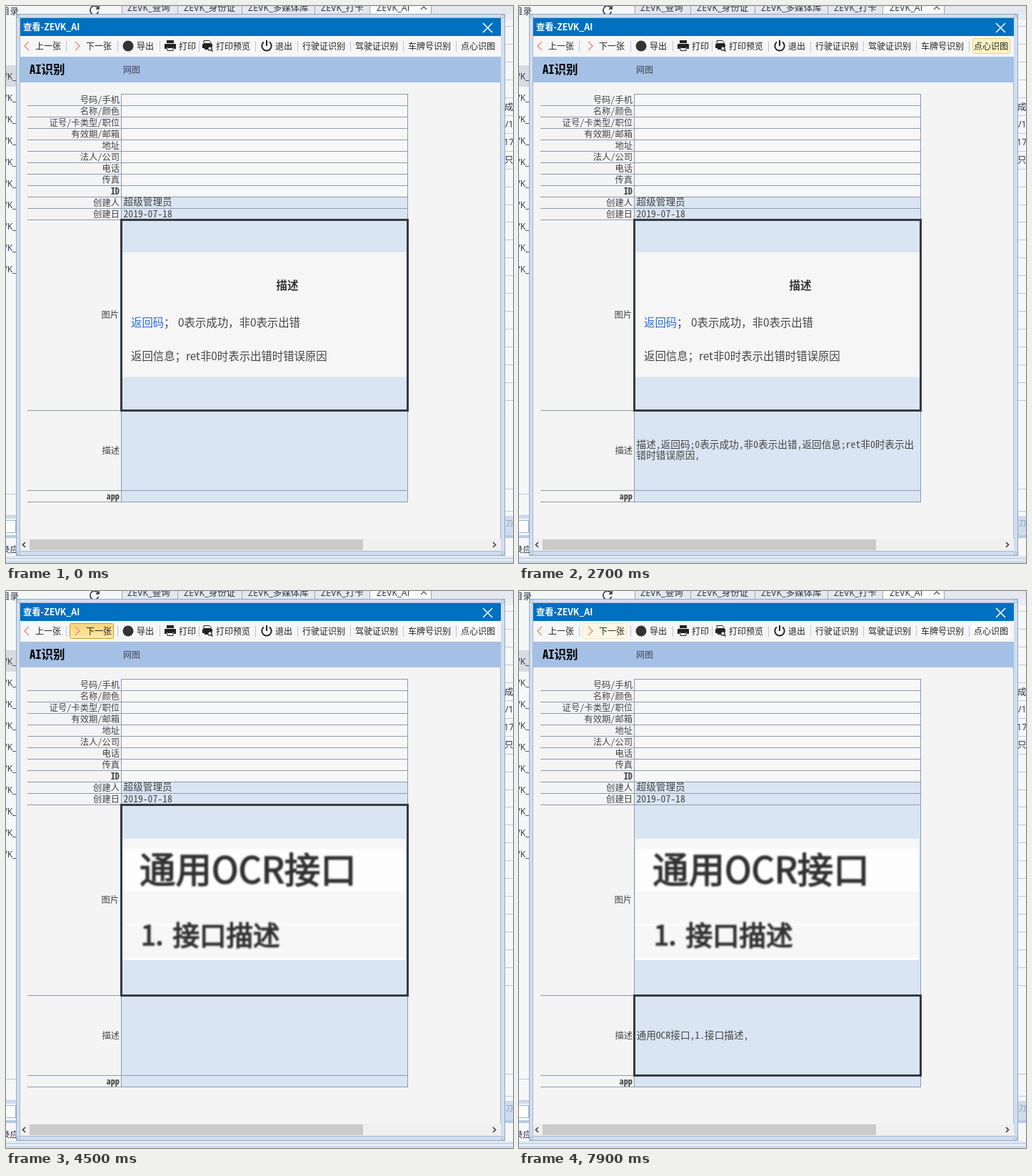
These frames come from a looping animation (710x780 px, 8 s). An HTML page:

```html
<!DOCTYPE html>
<html lang="zh-CN">
<head>
<meta charset="utf-8">
<title>AI识别</title>
<style>
html, body { margin: 0; width: 100%; height: 100%; overflow: hidden; background: #f5f6f8; }
svg { display: block; width: 710px; height: 780px; }
text { font-family: "Noto Sans CJK SC", "Noto Sans CJK JP", sans-serif; font-size: 12px; fill: #222; white-space: pre; }
.form text { font-family: "Noto Sans Mono CJK SC", "Noto Sans CJK SC", monospace; font-size: 12.3px; font-weight: 300; fill: #444; }
.form .val { font-size: 13.65px; }
.form .b, .b { font-weight: bold; }
.end { text-anchor: end; }
.mid { text-anchor: middle; }
.back text { font-family: "Open Sans", "Noto Sans CJK SC", sans-serif; font-size: 12.5px; fill: #2b3447; }
.back .end { font-size: 12px; }
.doc text { font-size: 15.4px; fill: #444; }
.big text { fill: #333; stroke: #333; stroke-width: 1.5; }
.grid { stroke: #8c9bad; fill: none; shape-rendering: crispEdges; }
.sep { stroke: #b5c8de; fill: none; shape-rendering: crispEdges; }
.focus { fill: none; stroke: #353b41; stroke-width: 3; shape-rendering: crispEdges; }
.hover { fill: #fdf2c6; stroke: #e9d28c; }
.press { fill: url(#gold); stroke: #c39a3c; }
.glow { fill: #fdfdfd; }

.anim { opacity: 0; animation: 8s step-end infinite; }
.pic-hover { animation-name: pic-hover; }
.pic-press { animation-name: pic-press; }
.pic-glow { animation-name: pic-glow; }
.next-hover { animation-name: next-hover; }
.next-press { animation-name: next-press; }
.next-glow, .second { animation-name: second; }
.first { animation-name: first; }
.focus-pic { animation-name: focus-pic; }
.focus-desc { animation-name: focus-desc; }
.read1 { animation-name: read1; }
.read2 { animation-name: read2; }

@keyframes pic-hover {
  0% { opacity: 0 } 17.5% { opacity: .08 } 18.75% { opacity: 0 }
  33.75% { opacity: 1 } 36.25% { opacity: .4 } 37.5% { opacity: 0 }
  68.75% { opacity: .4 } 70% { opacity: 1 } 71.25%, 100% { opacity: 0 }
}
@keyframes pic-press {
  0% { opacity: 0 } 18.75% { opacity: 1 } 26.25% { opacity: .6 } 27.5% { opacity: .3 }
  28.75% { opacity: 0 } 71.25% { opacity: 1 } 78.75% { opacity: .6 } 80% { opacity: .3 }
  81.25%, 100% { opacity: 0 }
}
@keyframes pic-glow { 0% { opacity: 0 } 26.25%, 100% { opacity: 1 } }
@keyframes next-hover {
  0% { opacity: 0 } 51.25% { opacity: .4 } 52.5% { opacity: 1 } 53.75% { opacity: 0 }
  98.75%, 100% { opacity: .45 }
}
@keyframes next-press {
  0% { opacity: 0 } 53.75% { opacity: 1 } 57.5% { opacity: .6 } 58.75% { opacity: .3 }
  60%, 100% { opacity: 0 }
}
@keyframes first { 0% { opacity: 1 } 56.25%, 100% { opacity: 0 } }
@keyframes second { 0% { opacity: 0 } 56.25%, 100% { opacity: 1 } }
@keyframes focus-pic { 0% { opacity: 1 } 40% { opacity: 0 } 56.25% { opacity: 1 } 85%, 100% { opacity: 0 } }
@keyframes focus-desc { 0% { opacity: 0 } 40% { opacity: 1 } 56.25% { opacity: 0 } 85%, 100% { opacity: 1 } }
@keyframes read1 { 0% { opacity: 0 } 26.25% { opacity: 1 } 56.25%, 100% { opacity: 0 } }
@keyframes read2 { 0% { opacity: 0 } 78.75%, 100% { opacity: 1 } }
</style>
</head>
<body>
<svg viewBox="0 0 710 780">
  <defs>
    <linearGradient id="gold" x2="0" y2="1">
      <stop offset="0" stop-color="#fbd480"/>
      <stop offset=".5" stop-color="#fddf8c"/>
      <stop offset="1" stop-color="#ffeaa4"/>
    </linearGradient>
    <filter id="soft"><feGaussianBlur stdDeviation=".8"/></filter>
  </defs>

  <!-- window behind -->
  <g class="back">
    <rect width="710" height="780" fill="#f6f7f9"/>
    <rect width="162" height="11" fill="#f5f6f8"/>
    <rect x="162" width="548" height="11" fill="#e5e8ee"/>
    <rect x="509" width="86" height="11" fill="#fafafa"/>
    <path class="sep" style="stroke:#9aa6b8" d="M162.500 0V11M240.500 0V11M330.500 0V11M432.500 0V11M509.500 0V11M595.500 0V11"/>
    <g id="tabs"></g>
    <path d="M581 5l4-4 4 4" fill="none" stroke="#666" stroke-width="1.500"/>
    <path d="M129 3A6 6 0 1 0 129.500 8M130 0V4H126" fill="none" stroke="#333" stroke-width="1.600"/>
    <text x="-7" y="12">目录</text>
    <rect y="83" width="14" height="30" fill="#d9dae2"/>
    <g id="side"></g>
    <path class="sep" d="M0 683.500H14M0 713.500H14"/>
    <rect y="714" width="14" height="4" fill="#cfdcee"/>
    <rect x="-2" y="720.500" width="15.500" height="17" fill="#fff" stroke="#9fb4d0"/>
    <rect y="741" width="14" height="4" fill="#b9cbe4"/>
    <text x="-7" y="766">录应</text>
    <rect x="699" y="11" width="11" height="9" fill="#e9edf4"/>
    <path id="rows" class="sep" style="stroke:#bcc8d8"/>
    <text x="698" y="146">成</text>
    <text x="699" y="170">/1</text>
    <text x="697" y="195">17</text>
    <text x="698" y="220">只</text>
    <path class="sep" d="M699 676.500H710M699 707.500H710"/>
    <rect x="699" y="714" width="11" height="27" fill="#cfdcee"/>
    <text x="700" y="728" style="font-size:10px;fill:#8799b2">刀</text>
    <rect x="699" y="741" width="11" height="4" fill="#b9cbe4"/>
    <rect y="770" width="710" height="10" fill="#e2eaf4"/>
    <path class="sep" d="M0 773.500H710M0 778.500H710"/>
  </g>

  <!-- dialog frame -->
  <rect x="14.500" y="11.500" width="684" height="758" fill="#d2deed" stroke="#8fa8c6"/>
  <rect x="19.500" y="16.500" width="673" height="747" fill="#f4f4f4" stroke="#a3b8d3"/>
  <g fill="#e8eff8" stroke="#8199b8" stroke-width=".8">
    <circle cx="17.500" cy="14.500" r="2"/><circle cx="695.500" cy="14.500" r="2"/>
    <circle cx="17.500" cy="766.500" r="2"/><circle cx="695.500" cy="766.500" r="2"/>
  </g>
  <rect x="20" y="17" width="673" height="25" fill="#0070c0"/>
  <text class="b" x="24" y="34" style="fill:#fff;font-size:12.300px">查看-ZEVK_AI</text>
  <path d="M668 24L681 37M681 24L668 37" stroke="#fff" stroke-width="1.500"/>

  <!-- toolbar -->
  <rect x="20" y="42" width="673" height="29" fill="#f6f6f6"/>
  <path id="seps" class="sep"/>
  <rect class="anim glow next-glow" x="89" y="45" width="62" height="22"/>
  <rect class="anim glow pic-glow" x="635" y="45" width="53" height="22"/>
  <rect class="anim hover next-hover" x="89.500" y="45.500" width="61" height="21" rx="2"/>
  <rect class="anim press next-press" x="89.500" y="45.500" width="61" height="21" rx="2"/>
  <rect class="anim hover pic-hover" x="635.500" y="45.500" width="52" height="21" rx="2"/>
  <rect class="anim press pic-press" x="635.500" y="45.500" width="52" height="21" rx="2"/>
  <path d="M32 50L26 56L32 62M97 50L103 56L97 62" fill="none" stroke="#ee8585" stroke-width="1.400"/>
  <circle cx="171" cy="56" r="7.500" fill="#333"/>
  <g fill="#222">
    <path d="M225 48h10v4h-10zM223 53h14q1 0 1 1v6h-3v-2h-10v2h-3v-6q0-1 1-1z"/>
    <path d="M226 58.500h8v4h-8z" fill="#f6f6f6" stroke="#222"/>
    <path d="M277 48.500h8l2 2v2h-10z" fill="#f6f6f6" stroke="#222"/>
    <path d="M276 53h12q1 0 1 1v3h-6v4h-5v-2h-3v-5q0-1 1-1z"/>
    <circle cx="285.500" cy="59.500" r="2.700" fill="#f6f6f6" stroke="#222" stroke-width="1.200"/>
    <path d="M287 61l2.500 2.500" stroke="#222" stroke-width="1.500"/>
  </g>
  <path d="M361 50.500A6.700 6.700 0 1 0 369 50.500M365 48V56" fill="none" stroke="#222" stroke-width="2"/>
  <g id="tools"></g>

  <!-- form -->
  <g class="form">
    <rect x="20" y="71" width="673" height="36" fill="#a4c0e4"/>
    <text class="b" x="33" y="95" style="font-size:16.500px;fill:#000">AI识别</text>
    <text x="164" y="93.500" style="font-size:12px;fill:#445">网图</text>
    <rect x="162" y="124" width="400" height="143" fill="#f7f7f7"/>
    <rect x="162" y="267" width="400" height="427" fill="#d9e5f2"/>
    <path id="grid" class="grid"/>
    <g id="labels"></g>
    <text class="val" x="164.500" y="279">超级管理员</text>
    <text class="val" x="164.500" y="295.500">2019-07-18</text>
    <g class="anim read1">
      <text class="val" x="164.500" y="618.500">描述,返回码;0表示成功,非0表示出错,返回信息;ret非0时表示出</text>
      <text class="val" x="164.500" y="633.500">错时错误原因,</text>
    </g>
    <text class="val anim read2" x="164.500" y="626.500">通用OCR接口,1.接口描述,</text>
  </g>

  <!-- pictures -->
  <g class="anim first doc">
    <rect x="163" y="345" width="398" height="174.500" fill="#f6f6f6"/>
    <text class="b mid" x="394" y="396.500" style="fill:#333">描述</text>
    <text x="175" y="449" style="fill:#2a6de0">返回码</text>
    <text x="221" y="449">；</text>
    <text x="241" y="449">0表示成功，非0表示出错</text>
    <text x="175" y="496">返回信息；ret非0时表示出错时错误原因</text>
  </g>
  <g class="anim second big">
    <rect x="163" y="347" width="397" height="169.500" fill="#f7f7f7"/>
    <path d="M163 361h397v60h-397zM163 466h397v2h-397zM163 513h397v3.500h-397z" fill="#fdfdfd"/>
    <g filter="url(#soft)">
      <text x="187" y="408.500" style="font-size:50.500px">通用OCR接口</text>
      <text x="189" y="496" style="font-size:37.500px">1.</text>
      <text x="233.500" y="496" style="font-size:37.500px">接口描述</text>
    </g>
  </g>
  <rect class="anim focus focus-pic" x="161.500" y="299.500" width="401" height="267"/>
  <rect class="anim focus focus-desc" x="161.500" y="566.500" width="401" height="112"/>

  <!-- scrollbar -->
  <rect x="20" y="746" width="673" height="17" fill="#f0f0f0"/>
  <rect x="33" y="747" width="467" height="15" fill="#cacaca"/>
  <path d="M27 751L23.500 754.500L27 758M682 751L685.500 754.500L682 758" fill="none" stroke="#444" stroke-width="1.700"/>
</svg>
<script>
const NS = 'http://www.w3.org/2000/svg';
const el = id => document.getElementById(id);

function put(id, x, y, str, cls = '') {
  const t = document.createElementNS(NS, 'text');
  t.setAttribute('x', x);
  t.setAttribute('y', y);
  t.setAttribute('class', cls);
  t.textContent = str;
  el(id).append(t);
}

const range = (n, f) => Array.from({ length: n }, (_, i) => f(i));

[[170, '查询'], [249, '身份证'], [339, '多媒体库'], [441, '打卡'], [519, 'AI']]
  .forEach(([x, s]) => put('tabs', x, 6.5, 'ZEVK_' + s));

range(10, i => put('side', 14.5, 103 + i * 30, 'ZEVK_', 'end'));
el('rows').setAttribute('d', range(22, i => `M699 ${Math.round(28 + i * 24.95)}.5H710`).join(''));

[[41, '上一张'], [112, '下一张'], [183, '导出'], [242, '打印'], [294, '打印预览'], [377, '退出'],
 [415, '行驶证识别'], [489, '驾驶证识别'], [563, '车牌号识别'], [637, '点心识图']]
  .forEach(([x, s]) => put('tools', x, 61, s));
el('seps').setAttribute('d', [84, 156, 215, 270, 349, 408, 482, 556, 630].map(x => `M${x}.5 49V64`).join(''));

const lines = [...range(11, i => 139 + i * 16), 566, 678, 694];
el('grid').setAttribute('d',
  'M161.5 123V695M562.5 123V695M161 123.5H563' + lines.map(y => `M30 ${y}.5H563`).join(''));

['号码/手机', '名称/颜色', '证号/卡类型/职位', '有效期/邮箱', '地址', '法人/公司', '电话', '传真', 'ID', '创建人', '创建日']
  .forEach((s, i) => put('labels', 159, 135.5 + i * 16, s, s === 'ID' ? 'end b' : 'end'));
put('labels', 158, 437, '图片', 'end');
put('labels', 159, 627, '描述', 'end');
put('labels', 159, 690.5, 'app', 'end b');
</script>
</body>
</html>
```
